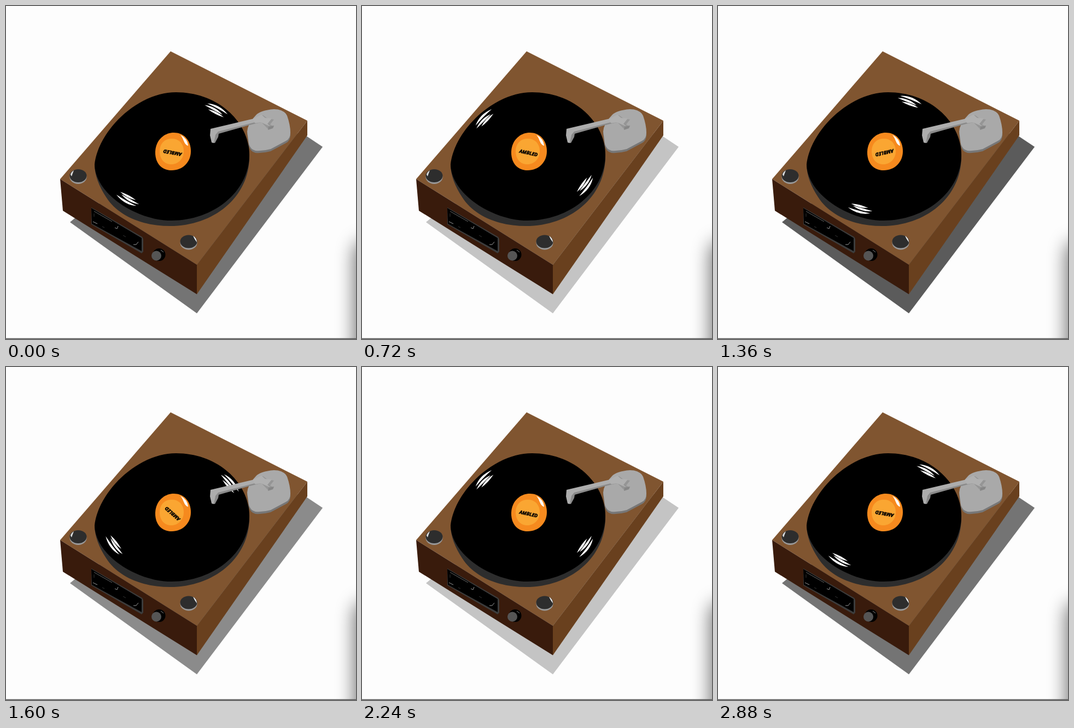
These frames come from a looping animation (640x610 px, 2.96 s). An HTML page:

```html
<!DOCTYPE html>
<html lang="en">
<head>
<meta charset="utf-8">
<title>Record player</title>
<style>
  html, body { margin: 0; width: 100%; height: 100%; overflow: hidden; background: #fdfdfd; }
  svg { display: block; width: 640px; height: 610px; }
  #player { filter: blur(.45px); }
  text { font: italic 900 8.8px "Noto Sans", sans-serif; text-anchor: middle; stroke: #000; stroke-width: .5px; }
</style>
</head>
<body>
<svg viewBox="0 0 640 610">
  <defs>
    <filter id="soft" x="-100%" y="-50%" width="300%" height="200%">
      <feGaussianBlur stdDeviation="17"/>
    </filter>
    <path id="plinth" d="M441 230Q442 215 457 200Q465 191 490 189Q508 189 514 201Q520 218 520 232Q520 243 512 247L484 262Q470 266 456 265Q447 263 444 252Z"/>
    <g id="glint" fill="#fff">
      <path d="M-20-3Q0-12 22-2Q0-4-20-3Z"/>
      <path d="M-23 2Q-4-5 14 3Q-4 3-23 2Z"/>
      <path d="M-14 6Q2 1 18 6Q2 9-14 6Z"/>
    </g>
    <g id="knob">
      <ellipse cy="2.5" rx="15.5" ry="12.5" fill="#999"/>
      <ellipse rx="15.5" ry="12" fill="#2d2d2d"/>
    </g>
  </defs>

  <rect x="637" y="431" width="120" height="280" rx="20" opacity=".55" filter="url(#soft)"/>
  <rect y="608.6" width="640" height="1.4" fill="#555"/>

  <g id="player">
    <path id="shadow" d="M117 396L349 563L579 258L540 232L300 300L140 377Z"/>

    <path fill="#805530" d="M301 83L551 210L349 474L99 317Z"/>
    <path fill="#69401e" d="M551 210V237L349 528V474Z"/>
    <path fill="#391b0c" d="M99 317L349 474V528L104 375Z"/>

    <path fill="#2d2d2d" d="M162 290L445 274C446 350 380 403 300 403C250 403 205 385 183 350C170 330 162 310 162 290Z"/>
    <path d="M162 290C168 231 238 158 311 158C390 158 446 215 445 274C444 340 380 393 302 393C240 393 163 345 162 290Z"/>
    <use class="glint" href="#glint"/>
    <use class="glint" href="#glint"/>

    <path fill="#f68a1e" d="M273 266C274 246 289 232 307 232C326 232 338 247 338 266C338 286 323 301 303 301C284 301 272 287 273 266Z"/>
    <path fill="#faa632" d="M281 266C281 252 290 243 303 243C317 243 325 253 325 266C325 280 315 290 302 290C289 290 281 280 281 266Z"/>
    <path fill="#fff" d="M319 236Q332 243 333 256Q328 255 325 247Q323 241 319 236Z"/>
    <text id="title" y="3.2">AMBLED</text>

    <use href="#plinth" y="4" fill="#777"/>
    <use href="#plinth" fill="#a9a9a9"/>
    <path fill="#959595" d="M446 218L467 213L480 226L490 221L483 217L490 208L478 206L470 200L452 208Z"/>
    <path fill="#b0b0b0" d="M449 208L467 199L474 205L486 206L478 216L484 221L466 213L447 216Z"/>
    <path fill="#868686" d="M480 221L490 219L488 224L479 227Z"/>
    <path fill="#8a8a8a" d="M380 226L452 211L456 215L389 234L388 240L382 251L376 250Z"/>
    <path fill="#adadad" d="M374 225L450 207L455 213L388 230L383 236L380 251L376 250L373 237Z"/>

    <use href="#knob" x="132" y="311"/>
    <path fill="#ddd" d="M118 309Q119 304 124 301L120 312Z"/>
    <use href="#knob" x="334" y="431.5"/>
    <path fill="#eee" d="M342 421Q349 425 349 433L345 427Z"/>

    <path fill="#3c3c3c" d="M156 369L249 423Q251 425 251 428V450L248 453L156 400Z"/>
    <path d="M156 370L248 425V449L157 399Z"/>
    <g fill="none" stroke="#999">
      <path d="M161 376L194 395" stroke="#666"/>
      <path d="M159 395L167 399M199 406L203 408L205 403M233 437L238 437L242 432"/>
      <path d="M161 380V386M176 404L180 406M214 420L219 423" stroke="#333"/>
    </g>
    <ellipse cx="280" cy="455.5" rx="11.5" ry="11.5"/>
    <ellipse cx="275" cy="457.5" rx="9" ry="9" fill="#555"/>
    <path d="M283 447L288 451" stroke="#888"/>
  </g>
</svg>
<script>
const LOOP = 2960, TICK = 80, POSE = 125, POSES = 12;
const shadow = document.getElementById("shadow");
const title = document.getElementById("title");
const glints = document.querySelectorAll(".glint");

// pose, turn
const titleKeys = [[0, 191], [4, 315], [9, 458], [11, 527], [12, 551]];
// pose, place on the disc, distance from centre, tilt
const glintKeys = [
  [[0, -52, .93, 27], [4, 14, .89, 114], [9, 58, .835, 142], [11, 111, .88, 194], [12, 131, .885, 208]],
  [[0, 131, .885, 208], [4, 209, .817, 303], [9, 252, .835, 328], [11, 291, .93, 380], [12, 308, .93, 387]]
];

function between(keys, pose) {
  const i = keys.findIndex(k => k[0] > pose);
  const a = keys[i - 1], b = keys[i];
  const p = (pose - a[0]) / (b[0] - a[0]);
  return a.slice(1).map((v, j) => v + (b[j + 1] - v) * p);
}

function place(el, x, y, turn) {
  el.setAttribute("transform", `translate(${x} ${y}) rotate(${turn})`);
}

function draw(time) {
  const t = Math.floor((time % LOOP) / TICK) * TICK;
  const pose = Math.floor((t + POSE - 2) / POSE) % POSES;

  // The shadow is darkest one pose before the cycle restarts
  const away = (pose + 1) % POSES;
  const k = Math.min(away, POSES - away);
  const grey = 91 + 26 * k - k * k;
  shadow.setAttribute("fill", `rgb(${grey},${grey},${grey})`);

  place(title, 304.5, 269, between(titleKeys, pose)[0]);
  glints.forEach((el, i) => {
    const [angle, radius, tilt] = between(glintKeys[i], pose);
    const a = angle * Math.PI / 180;
    place(el, 304 + 141 * radius * Math.cos(a), 276 + 117 * radius * Math.sin(a), tilt);
  });
}

const start = performance.now();
function frame() {
  draw(performance.now() - start);
  requestAnimationFrame(frame);
}
draw(0);
requestAnimationFrame(frame);
</script>
</body>
</html>
```
